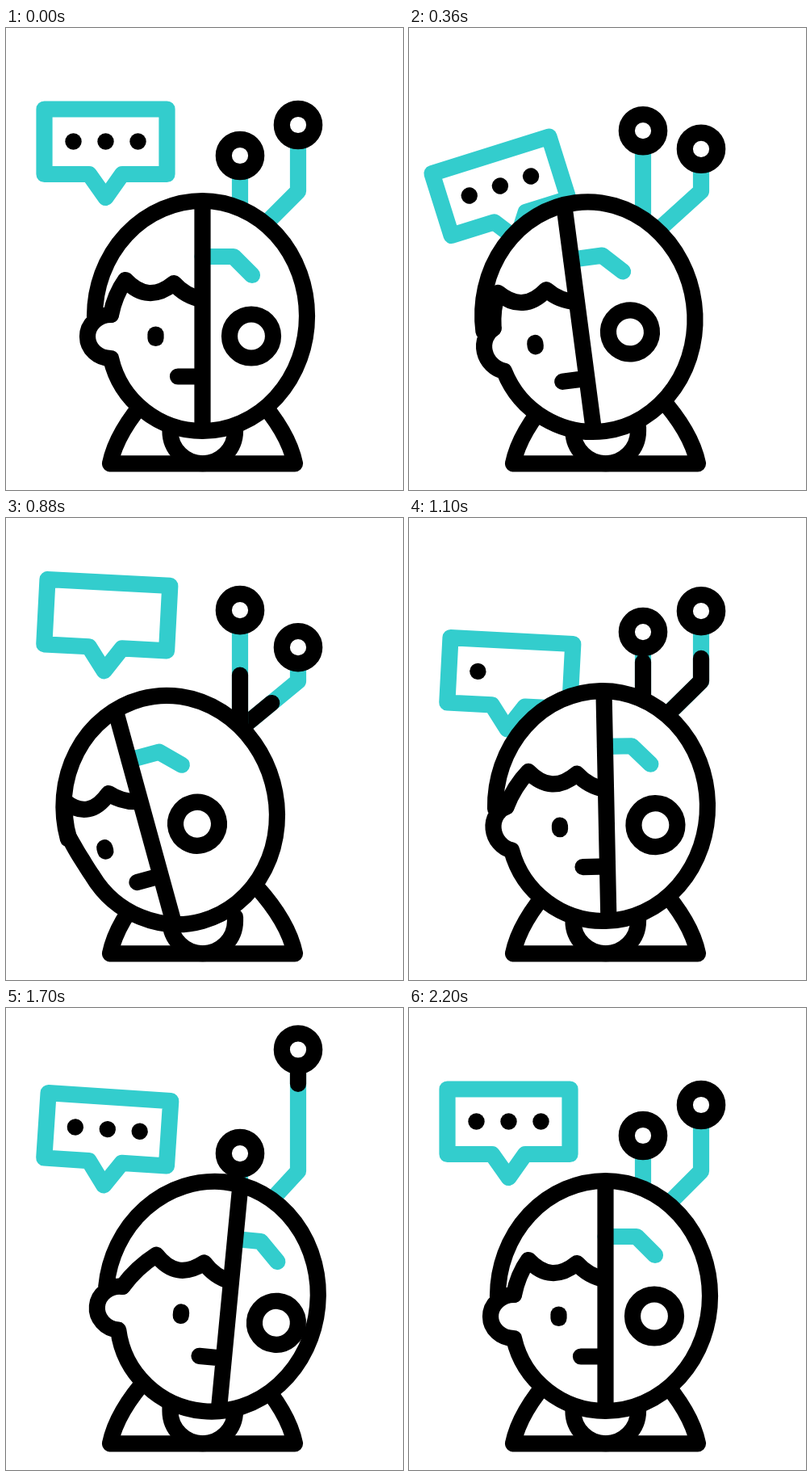
Animation, 492 px wide and 572 px high, one loop 2.4 s. Source, as an HTML page with a canvas:

```html
<!DOCTYPE html>
<html lang="en">
<head>
<meta charset="utf-8">
<title>Talking android</title>
<style>
  html, body { margin: 0; width: 492px; height: 572px; overflow: hidden; background: #fff; }
  canvas { display: block; }
</style>
</head>
<body>
<canvas id="stage" width="492" height="572"></canvas>
<script>
const ctx = document.getElementById('stage').getContext('2d');
const LOOP = 2400, BLACK = '#000', TEAL = '#33cdcd';

const clamp = u => Math.max(0, Math.min(1, u));
const mix = (a, b, u) => a + (b - a) * u;
const ease = u => u < .5 ? 4 * u ** 3 : 1 - 4 * (1 - u) ** 3;
const ramp = (t, from, to) => clamp((t - from) / (to - from));

// Eased value at time t, given key times and key values.
function track(t, times, values) {
  let v = values[0];
  for (let i = 1; i < times.length; i++)
    if (t > times[i - 1]) v = mix(values[i - 1], values[i], ease(ramp(t, times[i - 1], times[i])));
  return v;
}

function stroke(path, color = BLACK) {
  ctx.strokeStyle = color;
  ctx.stroke(typeof path === 'string' ? new Path2D(path) : path);
}

function ring(x, y, r) {
  ctx.beginPath();
  ctx.arc(x, y, r, 0, 7);
  ctx.fillStyle = '#fff';
  ctx.fill();
  ctx.strokeStyle = BLACK;
  ctx.stroke();
}

function pivot(x, y, degrees) {
  ctx.translate(x, y);
  ctx.rotate(degrees * Math.PI / 180);
  ctx.translate(-x, -y);
}

function drawBody() {
  stroke('M129 539.3H358Q350 500 310 456M129 539.3Q137 500 177 456');
  stroke('M203.5 494V499A40 40 0 0 0 284 499V494');
}

function drawBubble(t) {
  const angle = track(t, [0, 390, 790, 1100, 1500, 1740, 2160], [0, -17.5, 3, 3, -7.5, 4, 0]);
  const drop = track(t, [0, 375, 760, 1100, 1470, 1740, 2160], [0, 55, -36, 51.5, -22, 10, 0]);
  ctx.save();
  ctx.translate(angle * .6, drop);
  pivot(123.5, 140.7, angle);
  stroke('M47.5 100.5H199.5V181H144L123.5 210L103 181H47.5Z', TEAL);
  ctx.fillStyle = BLACK;
  for (let i = 0; i < 3; i++) {
    if (t >= 500 + 100 * i && t < 1060 + 100 * i) continue;
    ctx.beginPath();
    ctx.arc(83.5 + 40 * i, 140.5, 10.2, 0, 7);
    ctx.fill();
  }
  ctx.restore();
}

// A teal wire from base to tip with a black pulse running along it.
function drawWire(points, t) {
  const path = new Path2D();
  let length = 0;
  points.forEach(([x, y], i) => {
    path.lineTo(x, y);
    if (i) length += Math.hypot(x - points[i - 1][0], y - points[i - 1][1]);
  });
  stroke(path, TEAL);
  const lead = ramp(t, 450, 1392), trail = ramp(t, 1130, 1817);
  if (lead > trail) {
    ctx.setLineDash([length * (lead - trail), length * 2]);
    ctx.lineDashOffset = -length * trail;
    stroke(path);
    ctx.setLineDash([]);
  }
  ring(...points[points.length - 1], 20.2);
}

function drawAntennas(t, tilt) {
  const times = [0, 645, 683, 1560, 2200];
  drawWire([[290 + tilt, 274], [362, 202], [362, track(t, times, [120, 165.5, 165.5, 48.5, 120])]], t);
  drawWire([[290, 262], [290, track(t, times, [158, 111, 111, 181, 158])]], t);
}

function drawHead(t, tilt) {
  const times = [0, 780, 1350, 1445, 2165];
  const slide = track(t, times, [0, -36, 24.3, 24.3, 0]);
  const browSlide = track(t, times, [0, -36, 16, 16, 0]);
  const tuck = track(t, times, [0, 1, 0, 0, 0]);
  const ear = (open, tucked) => mix(open, tucked, tuck);
  const at = x => x + slide;

  // Tucked in, the ear becomes a straight part of the outline.
  const join = ear(130, 111), lobe = ear(130, 127), edge = ear(101, 119);
  const peak = Math.max(at(148), 119);
  const head = new Path2D(`M110 357A133.5 143 0 0 1 243.5 214
    A129.5 142.5 0 0 1 243.5 499C190 499 142 462 ${lobe} 409
    C${ear(114, 124)} ${ear(409, 400)} ${ear(101, 122)} ${ear(397, 391)} ${edge} 382
    C${ear(101, 116)} ${ear(367, 373)} ${ear(114, 114)} ${ear(355, 364)} ${join} 355`);

  ctx.save();
  pivot(243, 500, tilt);
  ctx.fillStyle = '#fff';
  ctx.fill(head);

  ctx.save();
  ctx.clip(head);
  stroke(`M${at(243.5)} 283H${282 + browSlide}l23 23`, TEAL);
  stroke(`M${at(243.5)} 205V508M${at(213)} 431.5H${at(243.5)}`);
  stroke(`M${at(185.5)} 379.5v4.5`);
  ring(at(304), 381.5, 27);
  ctx.restore();

  stroke(head);
  stroke(`M${join} 355Q${(join + peak) / 2 - 4} 330 ${peak} 312
    Q${at(176)} 342 ${at(208)} 316Q${at(222)} 332 ${at(243)} 336`);
  ctx.restore();
}

function draw(now) {
  const t = now % LOOP;
  const tilt = track(t, [0, 740, 1380, 1470, 2165], [0, -16.3, 6.4, 6.4, 0]);
  ctx.fillStyle = '#fff';
  ctx.fillRect(0, 0, 492, 572);
  ctx.lineWidth = 20.2;
  ctx.lineCap = ctx.lineJoin = 'round';
  drawBody();
  drawBubble(t);
  drawAntennas(t, tilt);
  drawHead(t, tilt);
}

let start;
function tick(now) {
  start ??= now;
  draw(now - start);
  requestAnimationFrame(tick);
}
requestAnimationFrame(tick);
</script>
</body>
</html>
```
